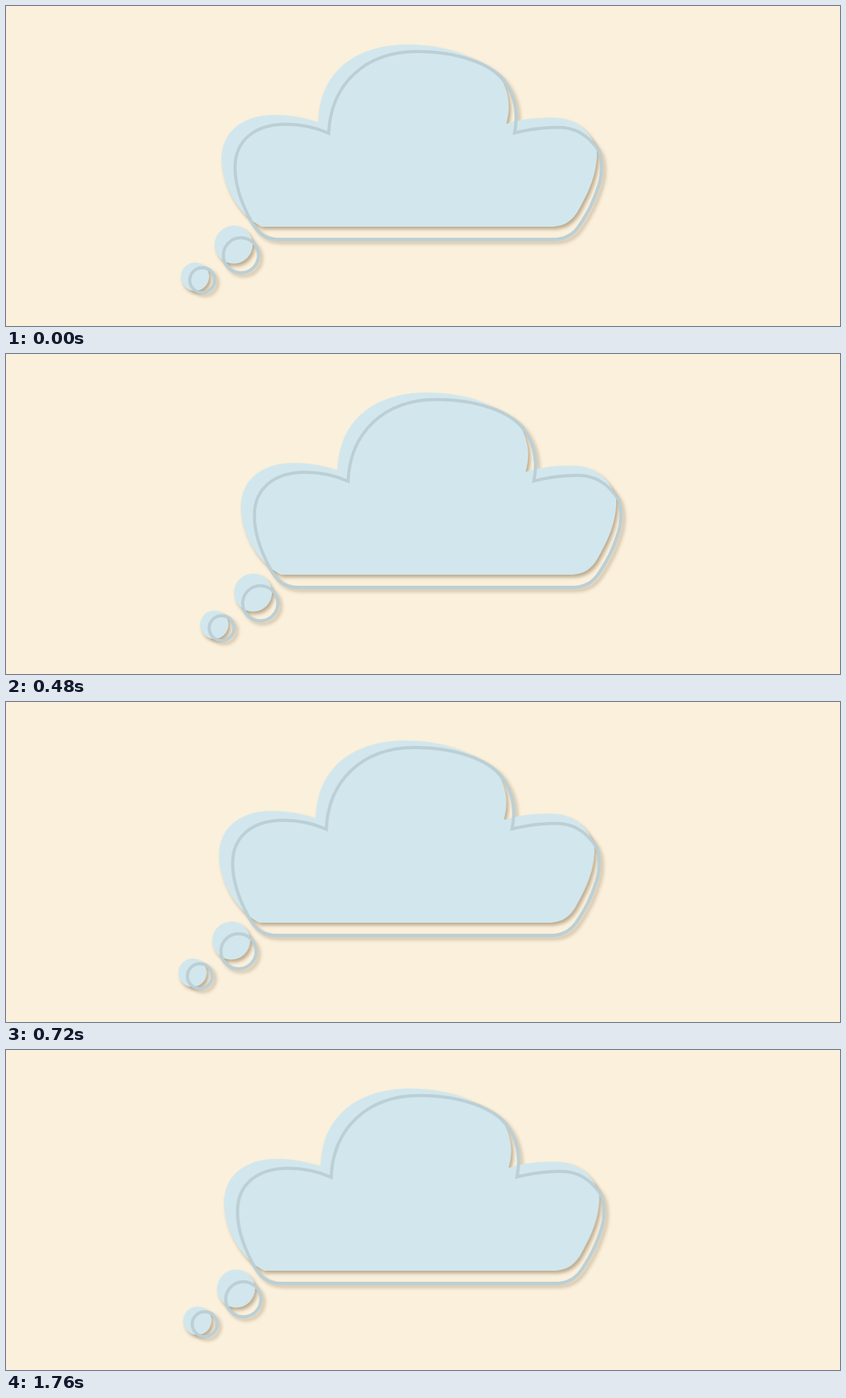
These frames come from a looping animation (1207x464 px, 1.84 s). An HTML page without scripts:

```html
<!DOCTYPE html>
<html lang="en">
<head>
<meta charset="utf-8">
<title>Thought cloud</title>
<style>
  html, body {
    margin: 0;
    width: 100%;
    height: 100%;
    overflow: hidden;
    background: #faf0dc;
  }
  svg {
    display: block;
    width: 100%;
    height: 100%;
  }
  .cloud { animation: nudge 1840ms step-end infinite; }
  .fill { fill: #d1e7ed; }
  .line { fill: none; stroke: #bbcfd5; stroke-width: 4.5; }
  .shade { filter: drop-shadow(3px 4px 2.5px rgba(100, 70, 30, .4)); }
  .soft { filter: drop-shadow(4px 4px 2.5px rgba(100, 70, 30, .3)); }

  /* 23 ticks of 80 ms */
  @keyframes nudge {
    0% { transform: translateX(0); }
    17.39% { transform: translateX(25px); }
    21.73% { transform: translateX(42.5px); }
    26.08% { transform: translateX(28px); }
    30.43% { transform: translateX(12.5px); }
    34.78% { transform: translateX(2px); }
    39.13% { transform: translateX(-3.5px); }
    43.47% { transform: translateX(-4.2px); }
    47.82% { transform: translateX(-3px); }
    52.17% { transform: translateX(-1.2px); }
    56.52% { transform: translateX(0); }
    91.3% { transform: translateX(19.5px); }
    95.65% { transform: translateX(3.5px); }
    100% { transform: translateX(0); }
  }
</style>
</head>
<body>
<svg viewBox="0 0 1207 464">
  <defs>
    <g id="outline">
      <path d="M394 338.5C373 338 363 327 355 312C340 285 331.500 258 331.500 234
        C331.500 195 360 171.500 405 171.500C430 171.500 450 177 467 184.500
        C470 115 518 66 595 66C655 66 700 84 720 107C736 128 742 154 736 184
        C762 177.500 780 176 800 176C825 176 843 188 857 209
        C864 222 863 244 858 260C850 285 842 300 830 318C821 332 809 338.500 792 338.500Z"/>
      <circle cx="340" cy="361.500" r="25.500"/>
      <circle cx="284" cy="397.500" r="18"/>
    </g>
  </defs>
  <g class="cloud">
    <use href="#outline" class="line soft"/>
    <g class="fill shade">
      <path d="M370 320C332 300 312 255 312 222C312 180 345 158 388 158
        C412 158 432 162 452 169C453 100 500 56 582 56C640 56 692 76 719 110
        C729 132 730 148 724 171C745 164 765 162 790 162C825 162 845 180 855 208
        C857 245 840 275 828 297C818 314 805 320 788 320Z"/>
      <circle cx="329.500" cy="346" r="27.500"/>
      <circle cx="273.500" cy="392.500" r="20.500"/>
    </g>
    <use href="#outline" class="line"/>
  </g>
</svg>
</body>
</html>
```
